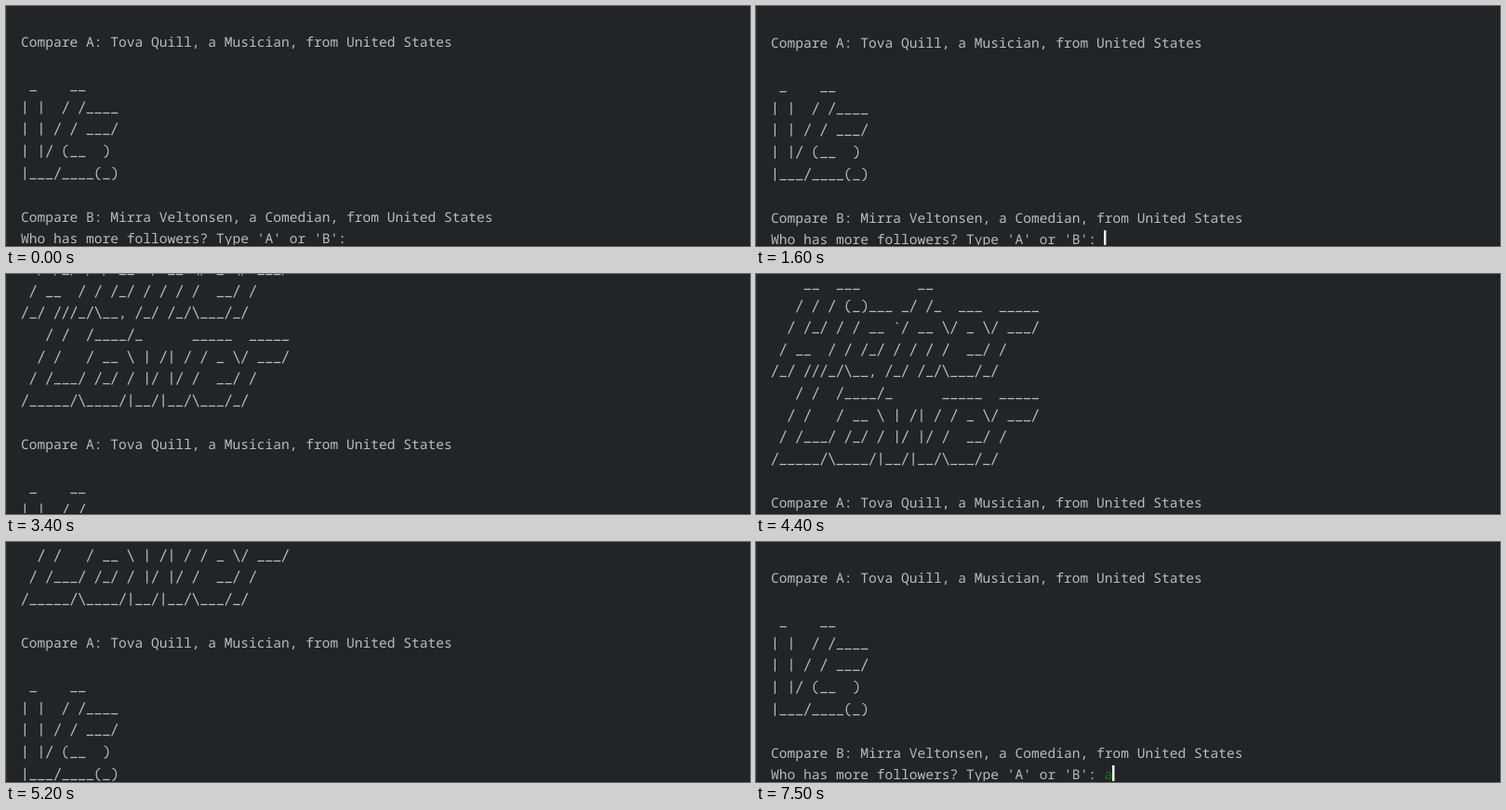
Write an HTML page with a canvas that moves like this. It is 800 px wide and 259 px high and loops after 8000 ms.

```html
<!DOCTYPE html>
<html lang="en">
<head>
<meta charset="utf-8">
<title>Higher Lower console</title>
<style>
  html, body { margin: 0; width: 100%; height: 100%; overflow: hidden; background: #222427; }
  canvas { display: block; }
</style>
</head>
<body>
<canvas id="stage" width="800" height="259"></canvas>
<pre id="console" hidden>
    __  ___       __
   / / / (_)___ _/ /_  ___  _____
  / /_/ / / __ `/ __ \/ _ \/ ___/
 / __  / / /_/ / / / /  __/ /
/_/ ///_/\__, /_/ /_/\___/_/
   / /  /____/_      _____  _____
  / /   / __ \ | /| / / _ \/ ___/
 / /___/ /_/ / |/ |/ /  __/ /
/_____/\____/|__/|__/\___/_/

Compare A: Tova Quill, a Musician, from United States

 _    __
| |  / /____
| | / / ___/
| |/ (__  )
|___/____(_)

Compare B: Mirra Veltonsen, a Comedian, from United States
Who has more followers? Type 'A' or 'B': </pre>
<script>
const ctx = document.getElementById('stage').getContext('2d');
const lines = document.getElementById('console').textContent.replace(/^\n/, '').split('\n');

const LOOP = 8000, TYPED_AT = 7500;
const LEFT = 16, COLUMN = 8.75, ROW = 23.6;
const FIRST_BASELINE = 44 - 10 * ROW;
const TEXT = '#bbbcba', INPUT = '#1f741f';

// [start time, scroll offset]: the wheel moves the view in hard jumps
const scrollSteps = [
  [0, 0], [1600, 1], [1900, 71], [2800, 142], [3400, 145],
  [3500, 208], [4600, 137], [5100, 70], [5700, 0]
];

// Strokes of the line-art characters, relative to the baseline
const strokes = {
  '/': new Path2D('M1.3 1.5 L7.4 -12'),
  '\\': new Path2D('M1.3 -12 L7.4 1.5'),
  '|': new Path2D('M4.4 1.8 V-12.3'),
  '_': new Path2D('M0.7 0.5 H8.05'),
  '(': new Path2D('M6.7 -12 C1 -10.5 1 0 6.7 1.5'),
  ')': new Path2D('M2 -12 C7.7 -10.5 7.7 0 2 1.5')
};

const scrollAt = t => scrollSteps.findLast(([start]) => t >= start)[1];

function cursorVisible(t) {
  const phase = t < 3000 ? t - 100 : t;
  return phase % 1000 >= 500;
}

function drawChar(char, x, y) {
  if (!strokes[char]) {
    ctx.fillText(char, x, y);
    return;
  }
  ctx.save();
  ctx.translate(x, y);
  ctx.stroke(strokes[char]);
  ctx.restore();
}

function draw(t) {
  ctx.fillStyle = '#222427';
  ctx.fillRect(0, 0, 800, 259);
  ctx.fillStyle = '#303235';
  ctx.fillRect(0, 0, 1, 259);

  ctx.font = '500 14.58px "Noto Sans Mono", monospace';
  ctx.textRendering = 'geometricPrecision';
  ctx.fillStyle = ctx.strokeStyle = TEXT;
  ctx.lineWidth = 1.25;
  const scroll = scrollAt(t);
  const baseline = row => Math.round(FIRST_BASELINE + row * ROW + scroll);
  lines.forEach((line, row) => {
    [...line].forEach((char, col) => {
      if (char !== ' ') drawChar(char, LEFT + col * COLUMN, baseline(row));
    });
  });

  const promptRow = lines.length - 1;
  const promptY = baseline(promptRow);
  let cursorX = LEFT + lines[promptRow].length * COLUMN;
  if (t >= TYPED_AT) {
    ctx.fillStyle = INPUT;
    ctx.fillText('a', cursorX, promptY);
    cursorX += COLUMN;
  }
  if (cursorVisible(t)) {
    ctx.fillStyle = '#f2f2f2';
    ctx.fillRect(Math.round(cursorX - 1), promptY - 15, 2.5, 20);
  }

  ctx.fillStyle = '#1f1e20';
  ctx.fillRect(0, 258, 800, 1);
}

const begin = performance.now();
function frame() {
  draw((performance.now() - begin) % LOOP);
  requestAnimationFrame(frame);
}
frame();
</script>
</body>
</html>
```
